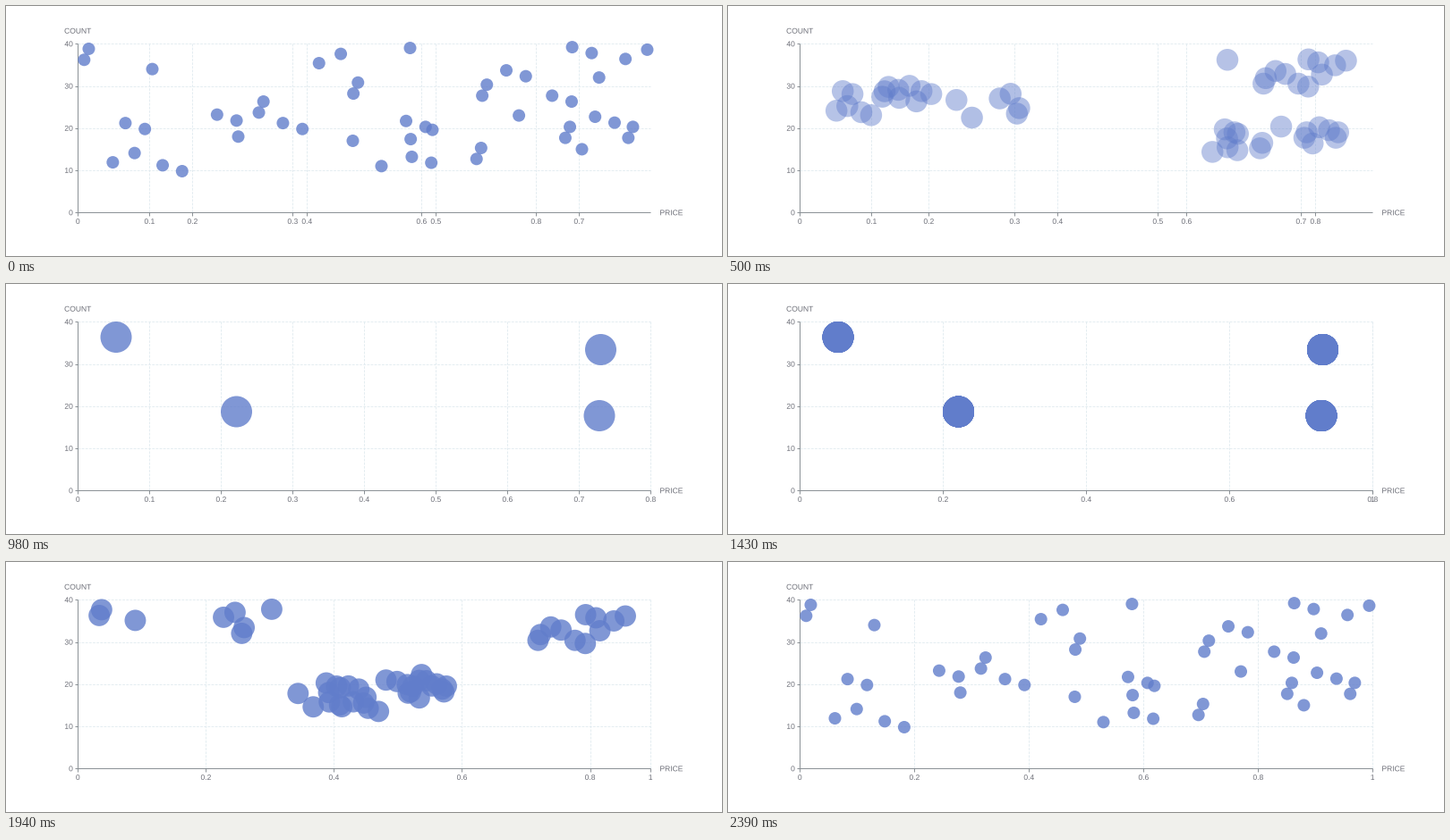
Write a matplotlib script that moves like this. It is 800x280 px and loops after 2.44 s.

```python
import numpy as np
import matplotlib.pyplot as plt
from matplotlib.animation import FuncAnimation
from matplotlib.patches import PathPatch
from matplotlib.textpath import TextPath
from matplotlib.transforms import Affine2D

W, H, DPI = 800, 280, 100
PX = 72 / DPI                      # points per pixel
LOOP, STEP = 2440, 10
DURATION = 1000
MERGED, SPLIT = 980, 1430          # the merged view rests between these times

LEFT, TOP, WIDTH, HEIGHT = 80.3, 42.3, 640, 189
RIGHT, BOTTOM = LEFT + WIDTH, TOP + HEIGHT
Y_MAX = 40

FILL = (97 / 255, 125 / 255, 203 / 255)
OPACITY = 0.8
R_SMALL, R_BIG = 7, 17.5
INK, AXIS, GRID = "#6E7079", "#80868C", "#E2EBF0"
FONT = dict(size=8.5, prop={"family": "Liberation Sans"})

# Cluster centres in pixels: two on the left, two on the right
CENTRES = np.array([(123, 59.5), (257.5, 143), (664.5, 73.5), (663, 147.5)])

# Most dots come in close pairs: a midpoint and a shared tilt
LONE = [(13, 34), (28, 18), (48, 17), (53, 11), (58, 39), (77, 23),
        (88, 15), (91, 32)]
STEEP = [(1.5, 37.5), (32, 25), (48.5, 29.5), (70, 14), (71, 29),
         (85.5, 19), (96.5, 19)]
RISING = [(8, 13), (44, 36.5), (60, 18.5), (97.5, 37.5)]
FALLING = [(10, 20.5), (16.5, 10.5), (26, 22.5), (37.5, 20.5), (59, 21),
           (60, 12.5), (76.5, 33), (84.5, 27), (88, 38.5), (92, 22)]


def pairs(middles, dx, dy):
    middles, tilt = np.array(middles), np.array([dx, dy])
    return np.vstack([middles - tilt, middles + tilt])


dots_data = np.vstack([LONE, pairs(STEEP, 0.4, 1.3), pairs(RISING, 1.9, 1.1),
                       pairs(FALLING, 1.7, -0.7)])
price, count = dots_data[:, 0] / 100, dots_data[:, 1]
home = np.column_stack([LEFT + WIDTH * price, BOTTOM - HEIGHT * count / Y_MAX])

# Merging goes by quadrant; splitting uses slightly shifted borders
merge_id = np.where(count > 25, np.where(price > 0.5, 2, 1),
                    np.where(price > 0.5, 3, 0))
split_id = np.where(count > 28 - 4 * price, np.where(price > 0.65, 2, 0),
                    np.where(price > 0.45, 1, 3))

# Stacked copies fade so that each full stack ends at the normal opacity
stack_size = np.bincount(merge_id)[merge_id]
merged_alpha = 1 - (1 - OPACITY) ** (1 / stack_size)


def ease(p):
    p = min(max(p, 0), 1)
    return 4 * p ** 3 if p < 0.5 else 1 - 4 * (1 - p) ** 3


def mix(a, b, k):
    return a + (b - a) * k


fig = plt.figure(figsize=(W / DPI, H / DPI), dpi=DPI, facecolor="white")
ax = fig.add_axes([0, 0, 1, 1])
ax.set_xlim(0, W)
ax.set_ylim(H, 0)
ax.axis("off")


def line(x0, y0, x1, y1, color=AXIS, z=2, **style):
    return ax.plot([x0, x1], [y0, y1], color=color, lw=0.9 * PX, zorder=z,
                   solid_capstyle="butt", **style)[0]


def grid_line(x0, y0, x1, y1):
    return line(x0, y0, x1, y1, GRID, 1, dashes=(3.1, 1.5))


class Label:
    """Outlined text, vertically centred, free to sit between pixels."""

    def __init__(self, x, y, text, align=0.5):
        path = TextPath((0, 0), text, **FONT)
        box = path.get_extents()
        self.shift = box.x0 + align * box.width
        self.y = y + 3
        self.patch = ax.add_patch(PathPatch(path, fc=INK, lw=0, zorder=3))
        self.move(x)

    def move(self, x):
        place = Affine2D().scale(1, -1).translate(x - self.shift, self.y)
        self.patch.set_transform(place + ax.transData)


class XTick:
    def __init__(self, value):
        self.value = value
        self.grid = grid_line(LEFT, TOP, LEFT, BOTTOM)
        self.mark = line(LEFT, BOTTOM, LEFT, BOTTOM + 3.5)
        self.label = Label(LEFT, BOTTOM + 9.7, f"{value:g}")

    def place(self, zoom, fine):
        v = self.value
        if v == 1:
            shown, share = not fine, 1
        elif round(v * 10) % 2:
            shown, share = fine, v / 0.8
        else:
            shown, share = True, mix(v, v / 0.8, zoom)
        x = LEFT + WIDTH * share
        self.grid.set_xdata([x, x])
        self.mark.set_xdata([x, x])
        self.label.move(x)
        for part in (self.grid, self.mark, self.label.patch):
            part.set_visible(shown)


for value in range(0, Y_MAX + 1, 10):
    y = BOTTOM - HEIGHT * value / Y_MAX
    if value:
        grid_line(LEFT, y, RIGHT, y)
    line(LEFT - 3.5, y, LEFT, y)
    Label(LEFT - 5.8, y, str(value), 1)

line(LEFT, TOP, LEFT, BOTTOM)
line(LEFT, BOTTOM, RIGHT, BOTTOM)
line(LEFT, BOTTOM, LEFT, BOTTOM + 3.5)
Label(LEFT, BOTTOM + 9.7, "0")
Label(LEFT, 27.7, "COUNT")
Label(RIGHT + 10.8, BOTTOM, "PRICE", 0)

x_ticks = [XTick(n / 10) for n in range(1, 11) if n != 9]
dots = ax.scatter(home[:, 0], home[:, 1], linewidths=0, zorder=5)


def show_dots(centres, radius, alpha):
    colors = np.empty((len(centres), 4))
    colors[:, :3] = FILL
    colors[:, 3] = alpha
    dots.set_offsets(centres)
    dots.set_sizes(np.full(len(centres), (2 * radius * PX) ** 2))
    dots.set_facecolors(colors)


def draw(frame):
    t = frame * STEP
    if t < MERGED:
        zoom = ease(t / DURATION)
        show_dots(mix(home, CENTRES[merge_id], zoom),
                  mix(R_SMALL, R_BIG, zoom), mix(OPACITY, merged_alpha, zoom))
    elif t < SPLIT:
        zoom = 1
        show_dots(CENTRES, R_BIG, OPACITY)
    else:
        zoom = 1 - ease((t - SPLIT) / DURATION)
        show_dots(mix(home, CENTRES[split_id], zoom),
                  mix(R_SMALL, R_BIG, zoom), OPACITY)
    for tick in x_ticks:
        tick.place(zoom, t < SPLIT)
    return []


anim = FuncAnimation(fig, draw, frames=LOOP // STEP, interval=STEP,
                     init_func=lambda: draw(0), repeat=True, repeat_delay=0,
                     blit=False)
plt.show()
```
